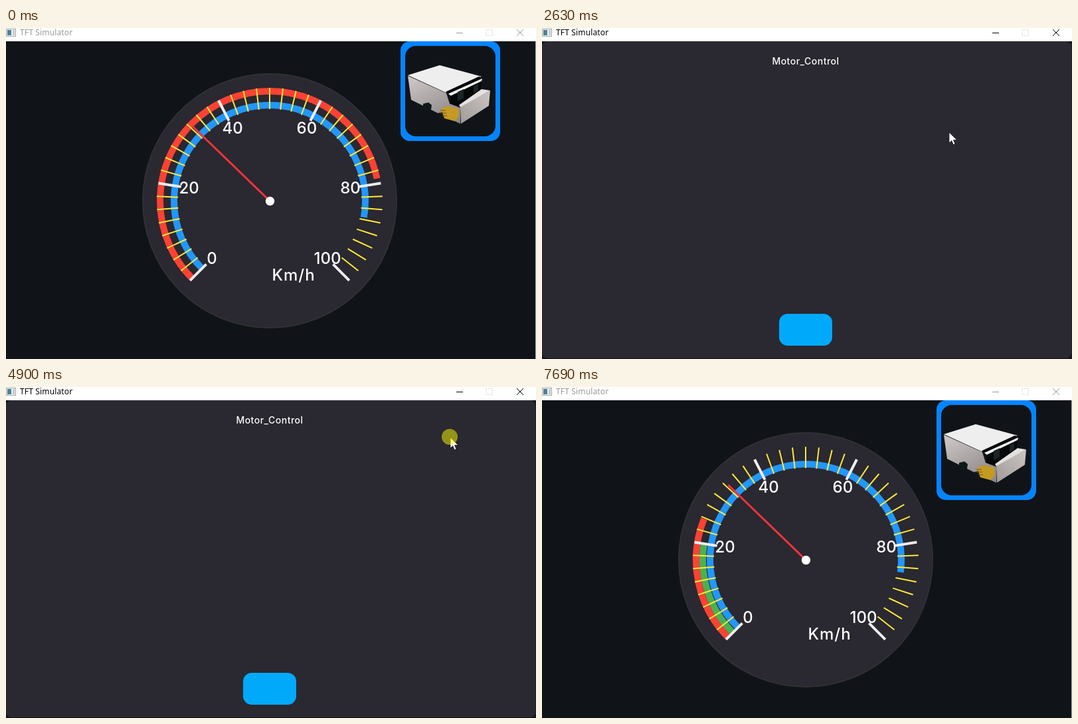
An HTML page that plays this animation: 798 px wide and 498 px high, repeating every 7.76 s.

```html
<!DOCTYPE html>
<html lang="en">
<head>
<meta charset="utf-8">
<title>TFT Simulator</title>
<style>
  html, body { margin: 0; width: 100%; height: 100%; overflow: hidden; background: #101418; }
  svg { display: block; width: 798px; height: 498px; }
  text { font-family: Inter, "Open Sans", sans-serif; font-weight: 500; fill: #fff; }
  .label { font-size: 24px; text-anchor: middle; }
  .heading { font-size: 14px; letter-spacing: .5px; text-anchor: middle; }
  .bar { color: #000; }
  .bar.idle { color: #999; }
  .bar text { font: 12px "Noto Sans", sans-serif; letter-spacing: .15px; fill: currentColor; }
  .edge { stroke: #1c2024; }
  .idle .edge { stroke: #aaa; }
  .arc { fill: none; stroke-width: 10; }
</style>
</head>
<body>
<svg viewBox="0 0 798 498">
  <defs>
    <path id="arrow" d="M0 0V16L3.800 12.600L6.300 18.500L9 17.400L6.500 11.600H11.800Z"
      fill="#fff" stroke="#111" stroke-width=".7"/>
    <linearGradient id="side" x2=".6" y2="1">
      <stop stop-color="#d0cac9"/><stop offset="1" stop-color="#8e8988"/>
    </linearGradient>
    <linearGradient id="tray" x1="1" x2="0" y2="1">
      <stop stop-color="#cbc6c4"/><stop offset="1" stop-color="#a09a98"/>
    </linearGradient>
  </defs>
  <rect width="798" height="498" fill="#101418"/>

  <g id="meterScreen">
    <circle cx="397" cy="260" r="191" fill="#2a2830" stroke="#2f3135" stroke-width="2"/>
    <g transform="translate(397 260)">
      <g id="arcs" transform="rotate(135)"></g>
      <g id="ticks"></g>
      <g id="labels"></g>
    </g>
    <text class="label" x="433" y="380" letter-spacing="1">Km/h</text>
    <path d="M397 260L280.500 147.500" stroke="#f0343d" stroke-width="3"/>
    <circle cx="397.500" cy="260.500" r="6.700" fill="#fff"/>

    <rect x="594" y="20" width="150" height="150" rx="14" fill="#0584ff"/>
    <rect x="601" y="27" width="136" height="136" rx="16" fill="#101418"/>
    <g id="vehicle">
      <path d="M605 72L663 98L668 114L684 120V144L656 131L610 108Z" fill="url(#side)"/>
      <path d="M605 71L653 56L716 73L662 97Z" fill="#eee"/>
      <path d="M662 96L712 73L718 75L668 99Z" fill="#080a0b"/>
      <path d="M666 99L717 76L716 80L670 102Z" fill="#f6f6f6"/>
      <path d="M670 102L716 80L714 100L685 118L669 114Z" fill="#050708"/>
      <path d="M680 96l9 -4v14l-9 4zM704 88l7 -4v10l-7 4z" fill="#1b2425"/>
      <path d="M684 118L729 94L727 117L685 144Z" fill="url(#tray)"/>
      <path d="M716 92L729 94L684 119L682 116Z" fill="#e4e1df"/>
      <path d="M628 114l8 -2l5 4l-1 7l-8 2l-4 -4zM651 128l7 -2l4 4l-1 7l-7 1l-3 -4z" fill="#10191a"/>
      <path d="M655 121L665 118L681 121L682 133L675 140L660 136Z" fill="#c49a22"/>
      <path d="M654 124h8M654 128h9M657 132h7" stroke="#79571d"/>
    </g>
  </g>

  <g id="motorScreen">
    <rect y="20" width="797" height="477" rx="8" fill="#2a2830"/>
    <text class="heading" x="397" y="55">Motor_Control</text>
    <rect x="357" y="430" width="80" height="48" rx="13" fill="#00a9fa"/>
  </g>

  <g id="bar" class="bar">
    <path class="edge" d="M797.500 20V498"/>
    <rect width="798" height="20" fill="#fff"/>
    <rect x=".5" y="1.500" width="14" height="11" fill="#f4f4f4" stroke="#a0a4a8"/>
    <rect x="2" y="3" width="6" height="8" fill="#4b8298"/>
    <rect x="10" y="3" width="3" height="8" fill="#c5c9cc"/>
    <text x="21" y="11">TFT Simulator</text>
    <path d="M678 7.500H688M769 2L779 12M779 2L769 12" stroke="currentColor"/>
    <rect x="723.500" y="2.500" width="9" height="9" fill="none" stroke="#efe6dc"/>
  </g>

  <use id="ghost" href="#arrow" x="629" y="124"/>
  <g id="cursor">
    <use href="#arrow"/>
    <circle id="press" cx="-1" cy="-1" r="12" fill="#ff0" opacity=".5"/>
  </g>
</svg>

<script>
const LOOP = 7760;
const STEP = 70;
const SPEED = 0.83; // simulator time per real time
const PAUSE = 100;
const $ = id => document.getElementById(id);

function add(parent, tag, attrs, text = '') {
  const node = document.createElementNS('http://www.w3.org/2000/svg', tag);
  for (const key in attrs) node.setAttribute(key, attrs[key]);
  node.textContent = text;
  parent.append(node);
  return node;
}

// Dial: 41 ticks over 270 degrees, every eighth one major
for (let i = 0; i <= 40; i++) {
  const major = i % 8 === 0;
  const angle = 135 + i * 6.75;
  add($('ticks'), 'path', {
    d: major ? 'M135 0H169.500' : 'M138 0H170',
    transform: `rotate(${angle})`,
    stroke: major ? '#eee' : '#ffe93b',
    'stroke-width': major ? 4 : 2
  });
  if (major) {
    const a = angle * Math.PI / 180;
    add($('labels'), 'text', {
      class: 'label', x: 123 * Math.cos(a), y: 123 * Math.sin(a) + 8.5
    }, i * 2.5);
  }
}

// Each arc rises, pauses, falls and pauses
const arcs = [
  { r: 165, color: '#fb4234', up: 2000, down: 500, start: 2205 },
  { r: 155, color: '#4cb050', up: 1000, down: 1000, start: 2108 },
  { r: 144, color: '#2297fb', up: 1000, down: 2000, start: 870 }
];
for (const arc of arcs) {
  arc.node = add($('arcs'), 'circle', {
    class: 'arc', r: arc.r, stroke: arc.color, pathLength: 400 / 3
  });
}

const clamp = v => Math.min(1, Math.max(0, v));

function level({ up, down, start }, t) {
  const p = (start + t * SPEED) % (up + down + 2 * PAUSE);
  return 100 * (p < up ? p / up : clamp(1 - (p - up - PAUSE) / down));
}

// Pointer: each move eases out to its goal and rests there
const entry = { x: 744, y: 520 };
const moves = [
  { from: 420, to: 1250, x: 657, y: 98 },
  { from: 2550, to: 3440, x: 397, y: 452 },
  { from: 3930, to: 4640, x: 669, y: 76 },
  { from: 5310, to: 5730, x: 397, y: 455 },
  { from: 6150, to: 6710, x: 651, y: 155 },
  { from: 6710, to: 7690, x: 720, y: 520 }
];

function pointerAt(t) {
  let { x, y } = entry;
  for (const move of moves) {
    const k = 1 - (1 - clamp((t - move.from) / (move.to - move.from))) ** 4;
    x += (move.x - x) * k;
    y += (move.y - y) * k;
  }
  return `translate(${Math.round(x)} ${Math.round(y)})`;
}

// Every click switches between the two screens
const clicks = [1950, 3650, 4700, 5800];
const PRESS = 270;
const SWITCH = 80;

const between = (t, from, to) => t >= from && t < to;
const show = (id, on) => { $(id).style.display = on ? '' : 'none'; };

function draw() {
  const now = performance.now() % LOOP;
  const t = Math.floor((now + 20) / STEP) * STEP;
  for (const arc of arcs) {
    const value = level(arc, t);
    arc.node.setAttribute('stroke-dasharray', `${value} 200`);
    arc.node.style.display = value > 0 ? '' : 'none';
  }
  const motor = clicks.filter(c => t >= c + SWITCH).length % 2 === 1;
  show('meterScreen', !motor);
  show('motorScreen', motor);
  show('press', clicks.some(c => between(t, c, c + PRESS)));
  show('ghost', between(t, 2600, 2700));
  $('bar').classList.toggle('idle', !between(t, 1320, 7340));
  $('cursor').setAttribute('transform', pointerAt(t));
  requestAnimationFrame(draw);
}
draw();
</script>
</body>
</html>
```
